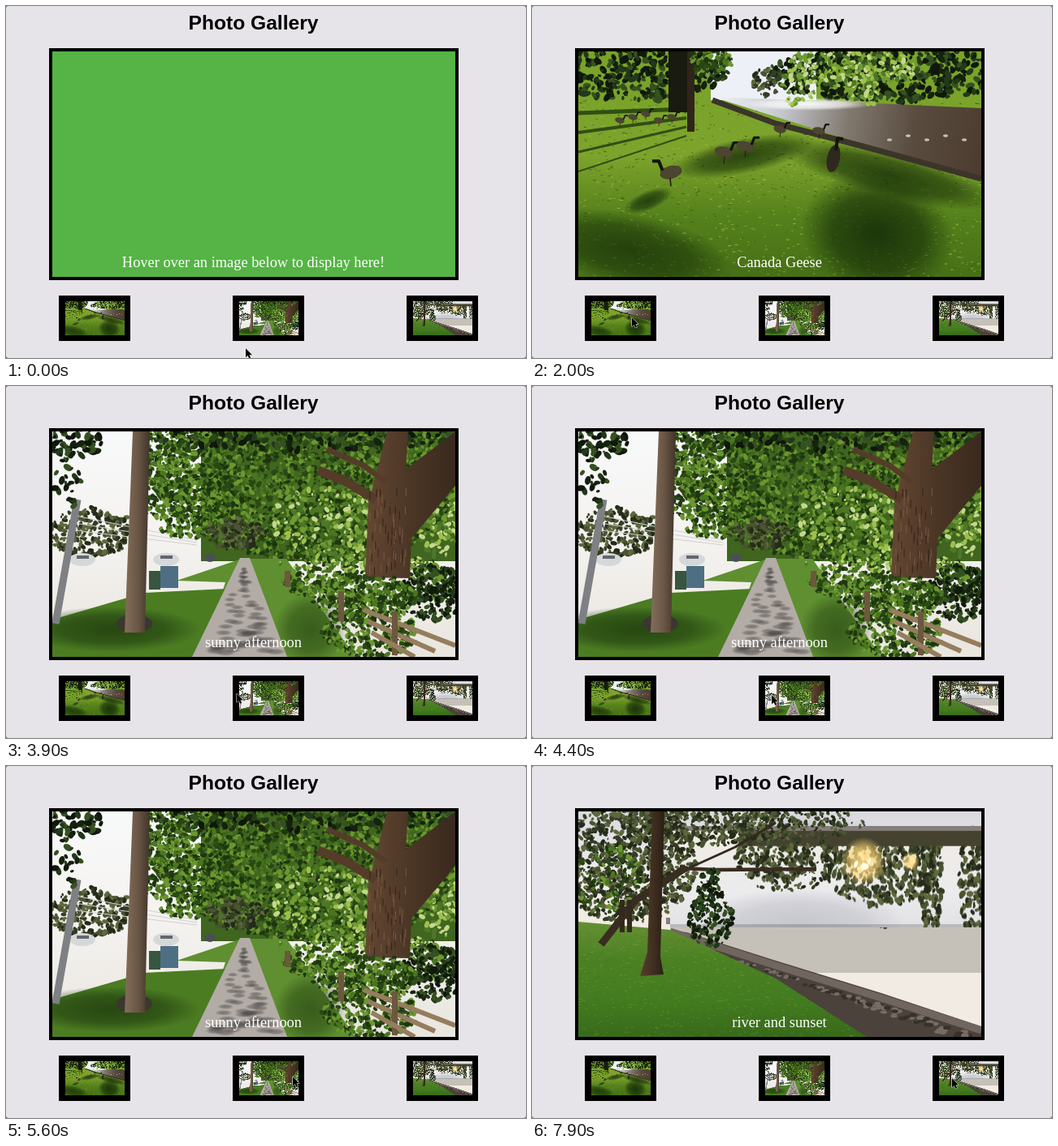
Write an HTML page with a canvas that moves like this. It is 640 px wide and 434 px high and loops after 8 s.

```html
<!DOCTYPE html>
<html lang="en">
<head>
<meta charset="utf-8">
<title>Photo Gallery</title>
<style>
html, body { margin: 0; width: 100%; height: 100%; overflow: hidden; background: #55545a; }
#stage { position: absolute; left: 0; top: 0; width: 640px; height: 434px; border-radius: 3px; background: #e6e4e8; overflow: hidden; }
#frame { position: absolute; left: 53px; top: 52px; width: 496px; height: 278px; border: 4px solid #000; background: #55b445; }
#frame canvas { position: absolute; left: 0; top: 0; visibility: hidden; }
#frame canvas.on { visibility: visible; }
.thumb { position: absolute; top: 357px; width: 88px; height: 56px; padding: 7.3px 7.5px; box-sizing: border-box; background: #000; }
svg { position: absolute; left: 0; top: 0; }
.title { font: bold 24.6px "Liberation Sans", Arial, sans-serif; }
.note { font: 18.4px "Liberation Serif", "Times New Roman", serif; fill: #fff; }
</style>
</head>
<body>
<div id="stage">
  <div id="frame"></div>
  <svg width="640" height="434" text-anchor="middle">
    <text class="title" x="304.5" y="29">Photo Gallery</text>
    <text class="note" id="note" x="304.5" y="322"></text>
    <path id="cursor" d="M0 0V11.2L2.6 8.9L4.3 12.8L6.2 12L4.5 8.2H8Z" stroke="#fff" paint-order="stroke"/>
  </svg>
</div>
<script>
const W = 496, H = 278, LEFT = 57, TOP = 56, RIGHT = LEFT + W, BOTTOM = TOP + H;
const deep = ['#15220e', '#22391a', '#0f180b', '#365120'];
const leafy = ['#2a4814', '#4a7620', '#6c9630', '#1e3610'];
const sunlit = ['#9fc04f', '#6f9b32', '#c3d78b', '#4f772a'];
const olive = ['#333d24', '#4a5432', '#242b1a', '#5f673d'];
const turf = ['#96b441', '#55801d', '#3d6413', '#7ea42f'];
let g, seed;

const rnd = () => (seed = seed * 16807 % 2147483647) / 2147483647;

function fade(x0, y0, x1, y1, ...colors) {
  const f = g.createLinearGradient(x0, y0, x1, y1);
  colors.forEach((c, i) => f.addColorStop(i / (colors.length - 1), c));
  return f;
}
function rect(color, x, y, w, h) { g.fillStyle = color; g.fillRect(x, y, w, h); }
function trace(p) {
  g.beginPath();
  for (let i = 0; i < p.length; i += 2) g.lineTo(p[i], p[i + 1]);
}
function poly(color, ...p) { g.fillStyle = color; trace(p); g.fill(); }
function line(color, width, ...p) { g.strokeStyle = color; g.lineWidth = width; trace(p); g.stroke(); }
function oval(color, x, y, rx, ry, turn = 0) {
  g.fillStyle = color;
  g.beginPath(); g.ellipse(x, y, rx, ry, turn, 0, 7); g.fill();
}
// soft-edged spot; rgb is "r,g,b"
function glow(rgb, a, x, y, rx, ry, turn = 0) {
  const f = g.createRadialGradient(0, 0, 0, 0, 0, 1);
  f.addColorStop(0, `rgba(${rgb},${a})`);
  f.addColorStop(.6, `rgba(${rgb},${a * .7})`);
  f.addColorStop(1, `rgba(${rgb},0)`);
  g.save();
  g.translate(x, y); g.rotate(turn); g.scale(rx, ry);
  oval(f, 0, 0, 1, 1);
  g.restore();
}
// leaves fill an ellipse; their number follows from its area
function leaves(colors, x, y, rx, ry, size = 3, cover = 1.6) {
  const n = cover * rx * ry / (size * size);
  for (let i = 0; i < n; i++) {
    const a = rnd() * 6.283, d = Math.sqrt(rnd()), s = size * (.5 + rnd());
    oval(colors[i % colors.length], x + Math.cos(a) * d * rx, y + Math.sin(a) * d * ry, s, s * .65, rnd() * 3);
  }
}
function grass(y) {
  for (let i = 0; i < 1800; i++) rect(turf[i % 4], LEFT + rnd() * W, y + rnd() * (BOTTOM - y), 1 + rnd() * 3, 1);
}
function goose(x, y, s, dir = 1) {
  g.save();
  g.translate(x, y); g.scale(s * dir, s);
  oval('#4c4530', 0, 0, 12, 7, .25);
  line('#15130d', 3.5, 9, -2, 13, -12, 20, -12);
  line('#2a2116', 1.5, 1, 6, 0, 15);
  g.restore();
}

function paintGeese() {
  const shade = '22,46,8';
  rect(fade(0, 110, 0, BOTTOM, '#7aa32a', '#7da32c', '#55811c', '#466f16'), LEFT, TOP, W, H);
  grass(115);
  glow(shade, .9, 425, 280, 95, 75, .2);
  glow(shade, .8, 440, 208, 140, 28, .25);
  glow(shade, .8, 260, 185, 90, 22, -.2);
  glow(shade, .8, 143, 240, 32, 12, -.4);
  glow(shade, .75, 120, 300, 130, 45, .2);
  for (let i = 0; i < 4; i++) line('#304f13', 5 - i, LEFT, 132 + i * 24, 190, 127 + i * 11);
  // sky, far trees, river
  rect('#edf1f7', 220, TOP, 130, 60);
  leaves(deep, 130, 75, 115, 42, 4);
  leaves(deep, 440, 84, 150, 34, 4);
  leaves(olive, 288, 94, 18, 18);
  poly(fade(225, 115, 553, 170, '#f1f3f6', '#c5c8ce', '#81796f', '#594b3e', '#4c3d30'),
    222, 112, 400, 119, RIGHT, 126, RIGHT, 213, 400, 168);
  glow('255,255,255', .9, 340, 121, 80, 8);
  line('#3b352a', 7, 222, 116, 300, 145, 400, 171, RIGHT, 213);
  // near trees
  rect('#191a10', 168, TOP, 25, 75);
  rect('#30251a', 191, TOP, 9, 99);
  leaves(leafy, 218, 66, 30, 15);
  leaves(sunlit, 395, 75, 82, 26, 3, .9);
  for (const x of [328, 408]) leaves(sunlit, x, 100, 20, 27, 3, .9);
  // birds
  for (let i = 0; i < 5; i++) goose(108 + i * 16, 141 - i % 3 * 4, .5);
  for (let i = 0; i < 5; i++) oval('#c5bfb5', 440 + i * 23, 165 - i % 2 * 5, 3, 1.7);
  goose(305, 152, .65);
  goose(353, 154, .65);
  goose(236, 180, .95);
  goose(262, 173, .9);
  goose(171, 205, 1.15, -1);
  oval('#2f281f', 371, 188, 8, 17, .2);
  line('#15130d', 4, 374, 178, 376, 163, 383, 164);
}

function paintSunny() {
  const bark = fade(440, 0, RIGHT, 0, '#654832', '#4b3626', '#3a291e');
  rect(fade(0, TOP, 0, BOTTOM, '#f8f9fa', '#f4f2ef', '#e9e5df'), LEFT, TOP, W, H);
  leaves(olive, 105, 180, 55, 30);
  for (let i = 0; i < 3; i++) line('#cfd0cf', 1, 85, 160 + i * 9, 235, 190 + i * 3);
  // canopy
  rect('#3f651f', 240, TOP, 313, 160);
  leaves(leafy, 220, 105, 60, 85);
  leaves(leafy, 380, 120, 195, 95);
  leaves(sunlit, 400, 165, 75, 42, 3, .7);
  leaves(sunlit, 535, 165, 28, 50, 3, .8);
  leaves(deep, 370, 60, 200, 20, 4, .8);
  leaves(olive, 280, 183, 40, 20);
  // lawn and path
  poly('#5f8f30', 210, 240, 290, 213, 345, 213, 430, BOTTOM, 240, BOTTOM, 270, 242);
  poly('#4b7c22', LEFT, 288, 170, 255, 270, 250, 235, BOTTOM, LEFT, BOTTOM);
  glow('30,58,14', .8, 130, 300, 110, 28);
  glow('30,58,14', .6, 375, 300, 45, 45);
  poly('#b3aca6', 288, 212, 300, 212, 346, BOTTOM, 229, BOTTOM);
  for (let i = 0; i < 70; i++) {
    const d = rnd();
    glow('75,72,72', .55, 293 - d * 5 + (rnd() - .5) * d * 90, 225 + d * 105, 4 + d * 9, 2 + d * 2);
  }
  leaves(leafy, 450, 240, 110, 32);
  leaves(sunlit, 435, 218, 100, 10, 2.5, .7);
  leaves(deep, 525, 255, 38, 35);
  leaves(leafy, 450, 305, 60, 30);
  // big tree
  poly(bark, 442, 236, 446, 146, 469, TOP, 495, TOP, 492, 103, RIGHT, TOP, RIGHT, 123, 499, 188, 497, 237);
  line('#543c29', 11, 455, 140, 415, 116, 384, 104);
  line('#543c29', 7, 467, 118, 440, 98, 395, 78);
  for (let i = 0; i < 60; i++) rect(i % 2 ? '#33241a' : '#795a41', 446 + rnd() * 47, 125 + rnd() * 100, 1, 10);
  leaves(leafy, 440, 262, 65, 30);
  // fence
  for (let i = 0; i < 3; i++) {
    rect('#6d573f', 343 + i * 66, 228 + i * 25, 7, 20 + i * 17);
    line('#957d5d', 6, 440 + i * 5, 276 + i * 14, 553 - i * 25, 320 + i * 7);
  }
  // street
  for (const x of [79, 182]) {
    oval('#d5d8d9', x + 15, 214, 16, 8);
    rect('#63676c', x + 8, 209, 15, 4);
  }
  oval('#4a4f56', 251, 212, 7, 5);
  rect('#37553f', 176, 228, 14, 23);
  rect('#4e6f83', 190, 222, 22, 27);
  line('#7e8084', 9, 88, 140, 61, 293);
  oval('#3b3630', 158, 293, 22, 11);
  poly(fade(148, 0, 177, 0, '#806b58', '#6a5645', '#40342a'), 156, TOP, 177, TOP, 171, 304, 146, 304);
  leaves(deep, 85, 66, 35, 22, 4);
  leaves(deep, 75, 115, 17, 45, 4, .6);
}

function paintSunset() {
  rect(fade(0, TOP, 0, 200, '#d9d9df', '#ecebed', '#f1ebe3'), LEFT, TOP, W, H);
  glow('178,180,190', .6, 330, 95, 130, 35);
  // far shore and its mirror image
  leaves(olive, 300, 165, 50, 28);
  leaves(olive, 430, 155, 75, 42);
  leaves(olive, 491, 138, 14, 54);
  leaves(olive, 541, 130, 16, 57);
  rect('#45432f', 255, 172, 298, 18);
  for (const x of [408, 466]) {
    const r = x < 450 ? 1 : .4;
    glow('255,214,120', .9, x, 157, 28 * r, 24 * r);
    leaves(['#fffbe7', '#ffe7a4'], x, 157, 12 * r, 10 * r, 3, .8);
  }
  rect('#857f7b', 165, 187, 388, 8);
  g.save();
  g.translate(0, 195); g.scale(1, -1.25);
  g.drawImage(g.canvas, 113, 36, 383, 100, 170, -3, 383, 100);
  g.restore();
  rect('rgba(45,43,32,.22)', 170, 195, 383, 60);
  // lawn and wall
  poly('#4b423b', 160, 202, 190, 205, 300, 240, 430, 280, RIGHT, 321, RIGHT, BOTTOM, 160, BOTTOM);
  line('#70665f', 9, 170, 204, 300, 246, 430, 286, RIGHT, 326);
  for (let i = 0; i < 140; i++) {
    const d = rnd();
    oval(i % 2 ? '#37312d' : '#766c64', 215 + d * 330, 227 + d * 103 + rnd() * 14 * d, 2 + d * 3, 1.5 + d);
  }
  g.save();
  trace([LEFT, 192, 170, 202, 300, 262, 412, BOTTOM, LEFT, BOTTOM]);
  g.clip();
  rect(fade(0, 192, 0, BOTTOM, '#658f33', '#4b8123', '#437c20', '#376a1a'), LEFT, 190, 360, 150);
  g.globalAlpha = .35;
  grass(200);
  g.restore();
  // near trees
  leaves(olive, 118, 120, 85, 74);
  leaves(leafy, 95, 140, 50, 45, 3, .5);
  leaves(olive, 220, 72, 110, 26);
  leaves(olive, 330, 70, 80, 20, 2.5, .7);
  leaves(olive, 315, 120, 65, 35, 2.5, .45);
  line('#33281d', 3, 195, 125, 250, 100, 300, 70);
  line('#392d21', 9, 85, 220, 128, 165, 190, 125);
  line('#392d21', 4.5, 185, 126, 225, 128, 350, 127);
  for (let i = 0; i < 2; i++) rect('#33291e', 108 + i * 9, 165, 6, 40);
  leaves(deep, 220, 190, 28, 33);
  leaves(deep, 219, 150, 15, 27);
  poly(fade(136, 0, 162, 0, '#513c2b', '#402f20', '#2b1f17'), 148, TOP, 163, TOP, 158, 235, 162, 257, 133, 259, 142, 230);
}

const stage = document.getElementById('stage'), frame = document.getElementById('frame');
const svg = document.querySelector('svg'), note = document.getElementById('note'), cursor = document.getElementById('cursor');

function addCanvas(parent, before) {
  const c = document.createElement('canvas');
  c.width = W; c.height = H;
  return parent.insertBefore(c, before);
}
const photos = [['Canada Geese', paintGeese], ['sunny afternoon', paintSunny], ['river and sunset', paintSunset]]
  .map(([name, paint], i) => {
    const view = addCanvas(frame, null), thumb = addCanvas(stage, svg), x = 65 + 214 * i;
    g = view.getContext('2d');
    g.lineJoin = 'round';
    g.translate(-LEFT, -TOP);
    seed = 4211 + i;
    paint();
    thumb.className = 'thumb';
    thumb.style.left = x + 'px';
    thumb.getContext('2d').drawImage(view, 0, 0);
    return { name, view, x };
  });

// mouse stops: time, x, y
const stops = [
  [0, 295, 422], [900, 128, 387], [2000, 123, 384], [3400, 284, 379], [3900, 284, 379],
  [4900, 306, 382], [6400, 410, 385], [6800, 416, 386], [7800, 517, 385], [8000, 517, 385]
];
function mouse(t) {
  const i = stops.findIndex(s => s[0] > t), [t0, x0, y0] = stops[i - 1], [t1, x1, y1] = stops[i];
  const u = (t - t0) / (t1 - t0), e = u * u * (3 - 2 * u);
  return [x0 + (x1 - x0) * e, y0 + (y1 - y0) * e];
}
// the photo under the mouse is the one on show
function draw(now) {
  const [x, y] = mouse(Math.floor(now % 8000 / 100) * 100);
  const hit = photos.find(p => x >= p.x && x < p.x + 88 && y >= 357 && y < 413);
  cursor.setAttribute('transform', `translate(${Math.round(x)} ${Math.round(y)})`);
  note.textContent = hit ? hit.name : 'Hover over an image below to display here!';
  photos.forEach(p => p.view.classList.toggle('on', p === hit));
}
let start;
function tick(now) {
  start ??= now;
  draw(now - start);
  requestAnimationFrame(tick);
}
draw(0);
requestAnimationFrame(tick);
</script>
</body>
</html>
```
